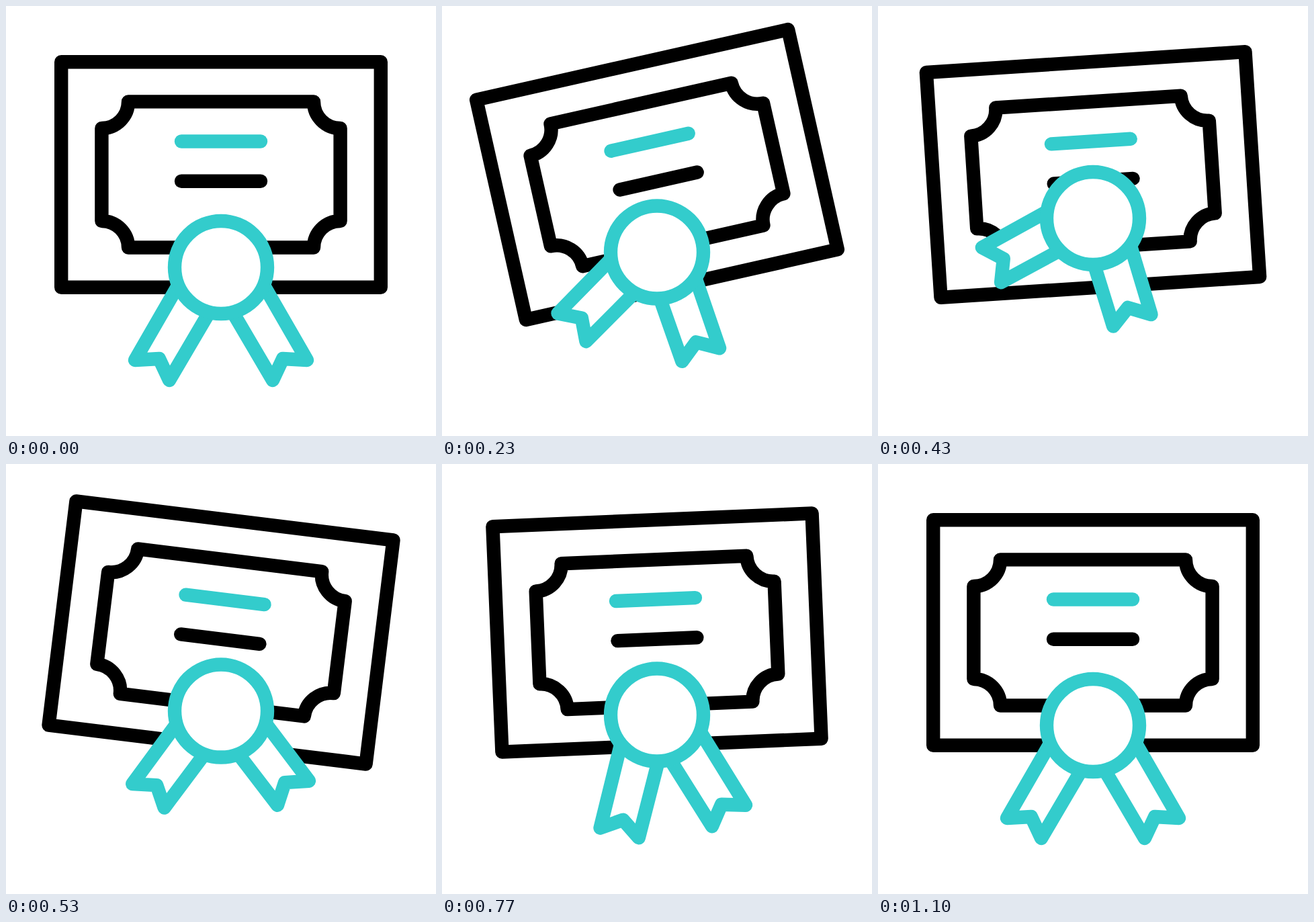
Recreate the animation shown at these times as an HTML page. Size 640 px wide and 640 px high, loop 1670 ms.

```html
<!DOCTYPE html>
<html lang="en">
<head>
<meta charset="utf-8">
<title>Certificate</title>
<style>
  html, body { margin: 0; width: 100%; height: 100%; overflow: hidden; background: #fff; }
  svg { display: block; width: 100%; height: 100%; }
  .ink { fill: none; stroke: #000; }
  .teal { fill: #fff; stroke: #3cc; }
</style>
</head>
<body>
<svg viewBox="0 0 640 640" stroke-width="20.4" stroke-linecap="round" stroke-linejoin="round">
  <defs>
    <path id="ribbon" d="M-63 25.4L-128 138L-92 136L-77 168L-17 66"/>
  </defs>
  <g id="sheet" class="ink">
    <rect x="82.2" y="83.2" width="475.6" height="335.6"/>
    <path d="M182 142.4H458A39.5 39.5 0 0 0 497.6 182V320A39.5 39.5 0 0 0 458 359.5H182A39.5 39.5 0 0 0 142.4 320V182A39.5 39.5 0 0 0 182 142.4Z"/>
    <path class="teal" d="M261 201.5H379"/>
    <path d="M261 260.7H379"/>
  </g>
  <g id="medal" class="teal">
    <use id="left" href="#ribbon"/>
    <use id="right" href="#ribbon"/>
    <circle r="69"/>
  </g>
</svg>
<script>
  const LOOP = 1670, STEP = 1000 / 30, LEAP = 4, REST = 33;

  const ease = x => (1 - Math.cos(Math.PI * Math.min(1, Math.max(0, x)))) / 2;

  // Leaves 0 at start, eases through the turning points [step, value], is back at 0 by REST.
  function swing(k, start, ...turns) {
    let [k0, v0] = [start, 0];
    for (const [k1, v1] of [...turns, [REST, 0]]) {
      if (k < k1) return v0 + (v1 - v0) * ease((k - k0) / (k1 - k0));
      [k0, v0] = [k1, v1];
    }
    return 0;
  }

  // The sheet rocks with evenly timed, shrinking turns.
  const rocks = [0, 1, 2, 3].map(n => [10 + 5.75 * n, -16 * (-0.44) ** n]);

  const place = (id, value) => document.getElementById(id).setAttribute('transform', value);
  const slide = d => `translate(${d * 0.5} ${d * -0.866})`;

  function draw(now) {
    const k = Math.floor((now % LOOP + 4) / STEP);
    const tilt = swing(k, 0, ...rocks);
    const hop = swing(k, LEAP, [12.2, -76], [19.75, 32], [25.7, -51]);
    const left = swing(k, LEAP, [11, 37], [20.7, -21.5], [28.5, 5.2]);
    const right = swing(k, LEAP, [10.3, 24], [17.5, -10.6], [28.4, 7]);
    const pull = ease((k - LEAP) / 4) - ease((k - 16) / 4);

    place('sheet', `rotate(${tilt} 320 251)`);
    place('medal', `translate(320 ${389 + hop})`);
    place('left', `rotate(${left}) ${slide(18 * pull)}`);
    place('right', `rotate(${right}) scale(-1 1) ${slide(21.5 * pull)}`);
  }

  const start = performance.now();
  function tick() {
    draw(performance.now() - start);
    requestAnimationFrame(tick);
  }
  tick();
</script>
</body>
</html>
```
